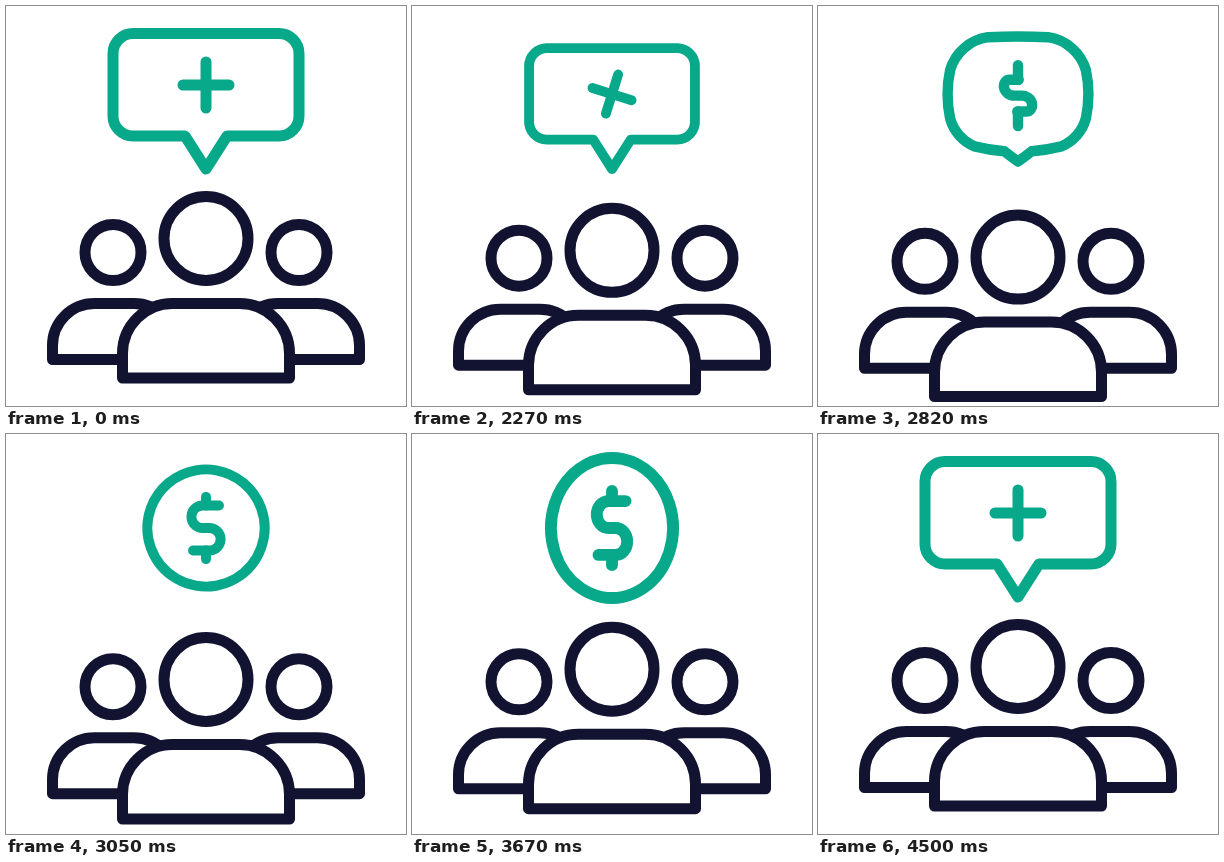
Recreate the animation shown at these times as an HTML page. Size 400 px wide and 400 px high, loop 4.52 s.

```html
<!DOCTYPE html>
<html lang="en">
<head>
<meta charset="utf-8">
<title>Team benefit</title>
<style>
  html, body { margin: 0; width: 100%; height: 100%; overflow: hidden; background: #fff; }
  svg { display: block; width: 100%; height: 100%; }
  svg * { stroke-linecap: round; stroke-linejoin: round; }
</style>
</head>
<body>
<svg viewBox="0 0 400 400">
  <g fill="none" stroke="#121331" stroke-width="11">
    <g id="sides">
      <circle cx="107" cy="246.5" r="28"/>
      <circle cx="293" cy="246.5" r="28"/>
      <path d="M46.5 353.5V339.5A42 42 0 0 1 88.5 297.5H128A42 42 0 0 1 170 339.5V353.5Z"/>
      <path d="M353.5 353.5V339.5A42 42 0 0 0 311.5 297.5H272A42 42 0 0 0 230 339.5V353.5Z"/>
    </g>
    <g id="lead">
      <circle cx="200" cy="232.5" r="42"/>
      <path fill="#fff" d="M116.5 372V347.5A50 50 0 0 1 166.5 297.5H233.5A50 50 0 0 1 283.5 347.5V372Z"/>
    </g>
  </g>
  <g id="sign" fill="none" stroke="#08a88a">
    <path id="frame"/>
    <g id="mark"><path id="bar"/><path id="stem"/></g>
  </g>
</svg>
<script>
const LOOP = 4520, CX = 200, COIN_Y = 94, TIP_Y = 163, KAPPA = 0.5523;
const el = id => document.getElementById(id);
const [sides, lead, sign, frame, mark, bar, stem] =
  ['sides', 'lead', 'sign', 'frame', 'mark', 'bar', 'stem'].map(el);

const mix = (a, b, p) => a + (b - a) * p;
const mixPt = (a, b, p) => [mix(a[0], b[0], p), mix(a[1], b[1], p)];
const span = (t, a, b) => Math.min(1, Math.max(0, (t - a) / (b - a)));
const inOut = u => u < 0.5 ? 2 * u * u : 1 - 2 * (1 - u) * (1 - u);

// Cubic ease with handles (x1, 0) and (x2, 1)
function ease(u, x1, x2) {
  let lo = 0, hi = 1;
  for (let i = 0; i < 24; i++) {
    const s = (lo + hi) / 2, r = 1 - s;
    if (3 * x1 * s * r * r + 3 * x2 * s * s * r + s * s * s < u) lo = s; else hi = s;
  }
  return lo * lo * (3 - 2 * lo);
}

// First point followed by groups of two handles and an end point
const curve = (pts, close) =>
  pts.map((p, i) => (i === 0 ? 'M' : i === 1 ? 'C' : '') +
    p[0].toFixed(2) + ' ' + p[1].toFixed(2)).join(' ') + (close ? 'Z' : '');

function bubblePts(k) {
  const y = v => TIP_Y + (v - TIP_Y) * k;
  const x = v => v * k;
  const top = y(27.5), low = TIP_Y - 33 * Math.min(k, 1), r = 20 * k, w = x(93);
  const nodes = [
    [-w + r, top], [w - r, top], [w, top + r], [w, low - r], [w - r, low],
    [21 * k, low], [0, TIP_Y], [-21 * k, low],
    [-w + r, low], [-w, low - r], [-w, top + r], [-w + r, top]
  ];
  const corner = { 1: [w, top], 3: [w, low], 8: [-w, low], 10: [-w, top] };
  const out = [nodes[0]];
  for (let i = 0; i < nodes.length - 1; i++) {
    const a = nodes[i], b = nodes[i + 1], c = corner[i];
    out.push(c ? mixPt(a, c, KAPPA) : mixPt(a, b, 1 / 3),
             c ? mixPt(b, c, KAPPA) : mixPt(a, b, 2 / 3), b);
  }
  return out;
}

function coinPts(k) {
  const r = 65 * k;
  const angles = [-10, 10, 70, 110, 150, 170, 180, 190, 210, 250, 290, 350]
    .map(a => a * Math.PI / 180);
  const at = (a, h) => [r * (Math.sin(a) + h * Math.cos(a)),
                        COIN_Y - r * (Math.cos(a) - h * Math.sin(a))];
  const out = [at(angles[0], 0)];
  for (let i = 0; i < angles.length - 1; i++) {
    const a = angles[i], b = angles[i + 1], h = 4 / 3 * Math.tan((b - a) / 4);
    out.push(at(a, h), at(b, -h), at(b, 0));
  }
  return out;
}

// Top half of the dollar's S; the rest is its point reflection
const half = [[14.4, -25], [8, -25], [2, -25], [-3.7, -25],
  [-10.6, -25], [-16.2, -19.4], [-16.2, -12.5],
  [-16.2, -5.6], [-10.6, 0], [-3.7, 0], [-1.2, 0]];
const dollar = [...half, ...half.slice().reverse().map(p => [-p[0], -p[1]])];

function draw(t) {
  // People
  const push = inOut(span(t, 2010, 2500)) * (1 - ease(span(t, 2500, 4500), 0.33, 0.2));
  lead.setAttribute('transform', `translate(0 ${(21 * push).toFixed(2)})`);
  sides.setAttribute('transform', `translate(0 ${(10 * push).toFixed(2)})`);

  // Bubble dips, swells, becomes a coin, then flips back
  const back = t >= 3905;
  let k1 = 1;
  if (!back) {
    k1 = 1 - 0.13 * Math.sin(span(t, 2000, 2200) * Math.PI / 2);
    k1 = mix(k1, 1.065, inOut(span(t, 2200, 2500)));
  }
  const k2 = mix(mix(0.9, 1.13, inOut(span(t, 3020, 3480))), 1, inOut(span(t, 3480, 3905)));
  const p = back ? 0 : inOut(span(t, 2500, 3020));
  const fx = back ? 1 - (1 - span(t, 3905, 4480)) ** 2 : 1 - span(t, 3540, 3905) ** 2;
  const place = q => [CX + q[0] * fx, q[1]];

  sign.setAttribute('stroke-width', (11 * mix(k1, k2, p)).toFixed(2));
  const coin = coinPts(k2);
  frame.setAttribute('d', curve(bubblePts(k1).map((q, i) => place(mixPt(q, coin[i], p))), true));

  // Plus turning into a dollar sign
  const plusY = TIP_Y - 84 * Math.min(k1, 1);
  const arm = k1 > 1 ? 23 + (k1 - 1) * 92 : 23 * k1;
  const n = dollar.length - 1;
  bar.setAttribute('d', curve(dollar.map((q, i) => place(mixPt(
    [arm * (2 * i / n - 1), plusY], [q[0] * k2, COIN_Y + q[1] * k2], p)))));
  const stub = s => {
    const a = mix(plusY + s * arm, COIN_Y + s * 34.5 * k2, p);
    const b = mix(plusY, COIN_Y + s * 25 * k2, p);
    return `M${CX} ${a.toFixed(2)}V${b.toFixed(2)}`;
  };
  stem.setAttribute('d', stub(-1) + stub(1));
  const turn = back ? 0 : 180 * inOut(span(t, 1990, 2500));
  mark.setAttribute('transform',
    turn > 0 && turn < 180 ? `rotate(${turn.toFixed(2)} ${CX} ${plusY.toFixed(2)})` : '');
}

function tick() {
  const t = performance.now() % LOOP;
  draw(t < 2010 ? 0 : t);
  requestAnimationFrame(tick);
}
tick();
</script>
</body>
</html>
```
